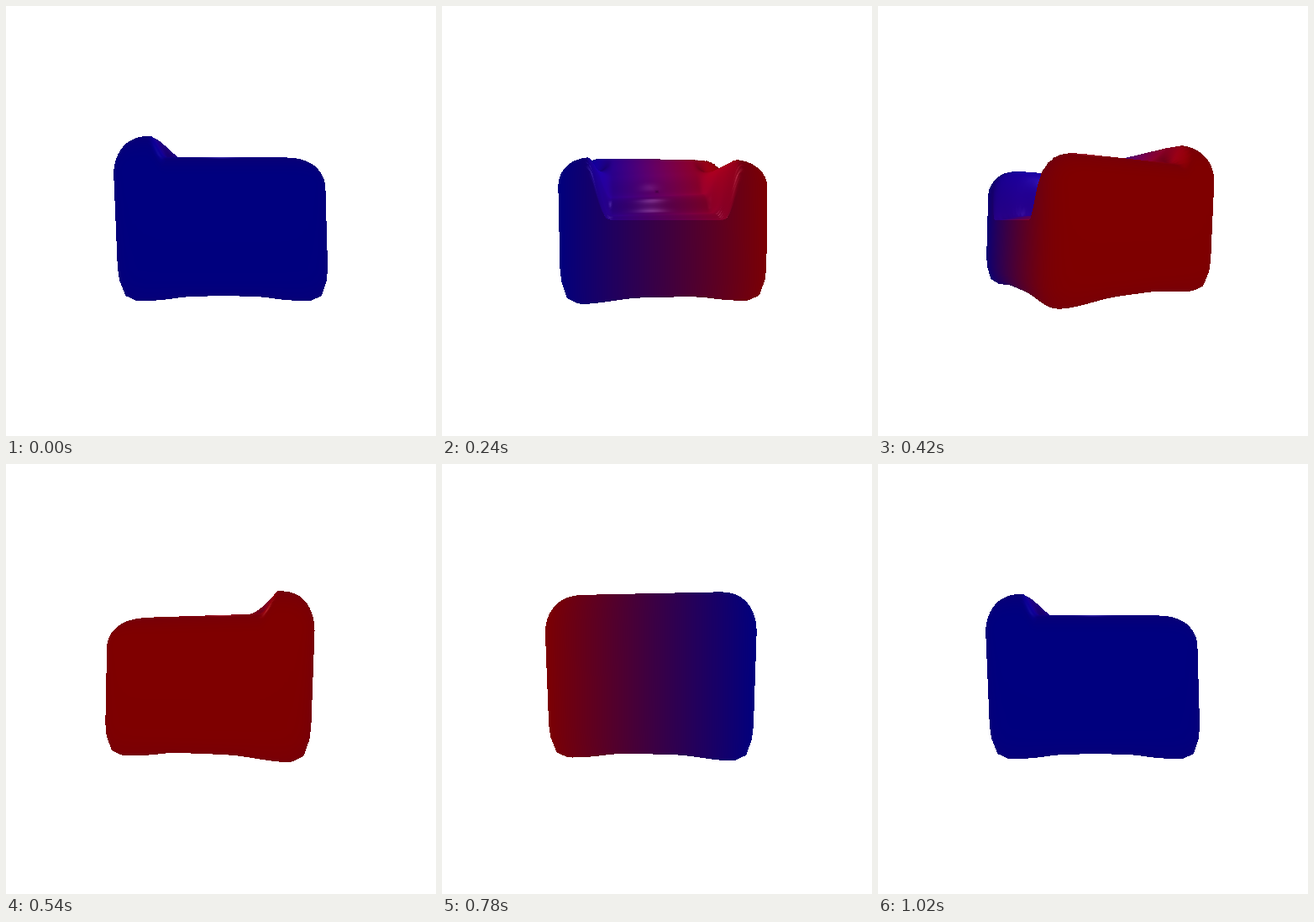
An HTML page with a canvas that plays this animation: 512x512 px, repeating every 1.08 s.

```html
<!DOCTYPE html>
<html>
<head>
<meta charset="utf-8">
<title>Turning armchair</title>
<style>
html, body { margin: 0; width: 100%; height: 100%; overflow: hidden; background: #fff; }
canvas { display: block; }
</style>
</head>
<body>
<canvas id="stage" width="512" height="512"></canvas>
<script>
const SIZE = 512, FOCAL = 443.4, HALF = 0.2285;
const SEGMENTS = 200, TOP_ROWS = 56;
const LIGHT = [0, 0.24, 0];
const STEP = 60, STEPS = 18;

const ctx = document.getElementById('stage').getContext('2d');
const image = ctx.createImageData(SIZE, SIZE);
const pixels = new Uint32Array(image.data.buffer);
const depths = new Float32Array(SIZE * SIZE);

const clamp = v => Math.min(1, Math.max(0, v));
const smooth = (a, b, v) => { const t = clamp((v - a) / (b - a)); return t * t * (3 - 2 * t); };
const mix = (a, b, t) => a + (b - a) * t;
const sub = (a, b) => a.map((v, i) => v - b[i]);
const dot = (a, b) => a[0] * b[0] + a[1] * b[1] + a[2] * b[2];
const cross = (a, b) => [a[1] * b[2] - a[2] * b[1], a[2] * b[0] - a[0] * b[2], a[0] * b[1] - a[1] * b[0]];
const unit = a => { const n = Math.hypot(...a) || 1; return a.map(v => v / n); };

// Upper surface: sloping, rippled seat between arms, rising to the back
function topHeight(x, z) {
  const s = clamp((0.21 - x) / 0.35);
  const ripple = 0.036 * s * (1 - s) * Math.sin(19 * s + 5 * z);
  const seat = 0.004 + 0.187 * s ** 1.6 + ripple;
  const arm = 0.143 + 0.049 * smooth(-0.115, -0.15, x);
  return mix(seat, arm, smooth(0.12, 0.165, Math.abs(z)));
}

// [outline scale, height] from the wall foot to the middle of the underside
const FOOT = [[1, -0.1], [0.99, -0.128], [0.95, -0.15], [0.88, -0.162], [0.78, -0.165], [0, -0.15]];
const ROWS = TOP_ROWS + 2 + FOOT.length;

function point(row, seg) {
  const a = seg / SEGMENTS * 2 * Math.PI, c = Math.cos(a), s = Math.sin(a);
  const r = HALF * (Math.abs(c) ** 12 + Math.abs(s) ** 12) ** (-1 / 12);
  let k = 1, y;
  if (row <= TOP_ROWS + 1) {
    k = Math.sin(Math.min(1, row / TOP_ROWS) * Math.PI / 2);
    const e = clamp((k - 0.65) / 0.35);
    y = topHeight(k * r * c, k * r * s) * (0.5 + 0.5 * Math.sqrt(1 - e ** 2.4));
    if (row > TOP_ROWS) y -= 0.008;
  } else {
    [k, y] = FOOT[row - TOP_ROWS - 2];
    if (y < -0.14) y -= 0.012 * Math.abs(Math.sin(2 * a)) ** 5;
  }
  // The back leans and the sides flare towards the top
  return [1.01 * k * r * c - 0.035 * y, y, k * r * s * (1 + 0.12 * y)];
}

const grid = [];
for (let i = 0; i < ROWS; i++)
  grid.push(Array.from({ length: SEGMENTS }, (_, j) => ({ p: point(i, j) })));

grid.forEach((line, i) => line.forEach((v, j) => {
  const along = sub(line[(j + 1) % SEGMENTS].p, line[(j + SEGMENTS - 1) % SEGMENTS].p);
  const down = sub(grid[Math.min(ROWS - 1, i + 1)][j].p, grid[Math.max(0, i - 1)][j].p);
  v.n = unit(cross(along, down));
  v.toLight = unit(sub(LIGHT, v.p));
  v.diffuse = Math.max(0, dot(v.n, v.toLight));
  v.blue = clamp(v.p[2] / HALF / 2 + 0.5);
}));

function project(v, sin, cos) {
  const [x, y, z] = v.p;
  v.d = 1 - x * sin - z * cos;
  v.x = 256 + FOCAL * (x * cos - z * sin) / v.d;
  v.y = 256 - FOCAL * y / v.d;
  let shine = 0;
  if (v.diffuse > 0) {
    const view = unit(sub([sin, 0, cos], v.p));
    const bounce = v.n.map((n, i) => 2 * v.diffuse * n - v.toLight[i]);
    shine = 51 * Math.max(0, dot(view, bounce)) ** 64;
  }
  const lit = 255 * (0.5 + 0.3 * v.diffuse);
  v.rgb = [lit * (1 - v.blue) + shine, shine, lit * v.blue + shine];
}

function triangle(a, b, c) {
  const area = (b.x - a.x) * (c.y - a.y) - (b.y - a.y) * (c.x - a.x);
  if (Math.abs(area) < 1e-6) return;
  const x0 = Math.ceil(Math.min(a.x, b.x, c.x) - 0.5), x1 = Math.max(a.x, b.x, c.x) - 0.5;
  const y0 = Math.ceil(Math.min(a.y, b.y, c.y) - 0.5), y1 = Math.max(a.y, b.y, c.y) - 0.5;
  for (let y = y0; y <= y1; y++) {
    for (let x = x0; x <= x1; x++) {
      const px = x + 0.5 - a.x, py = y + 0.5 - a.y;
      const v = (px * (c.y - a.y) - py * (c.x - a.x)) / area;
      const w = (py * (b.x - a.x) - px * (b.y - a.y)) / area;
      const u = 1 - v - w;
      if (u < -1e-6 || v < -1e-6 || w < -1e-6) continue;
      const d = u / a.d + v / b.d + w / c.d, at = y * SIZE + x;
      if (d <= depths[at]) continue;
      depths[at] = d;
      const tone = i => u * a.rgb[i] + v * b.rgb[i] + w * c.rgb[i] & 255;
      pixels[at] = (255 << 24 | tone(2) << 16 | tone(1) << 8 | tone(0)) >>> 0;
    }
  }
}

function draw(angle) {
  const sin = Math.sin(angle), cos = Math.cos(angle);
  pixels.fill(0xffffffff);
  depths.fill(0);
  for (const line of grid) for (const v of line) project(v, sin, cos);
  for (let i = 1; i < ROWS; i++) {
    for (let j = 0; j < SEGMENTS; j++) {
      const k = (j + 1) % SEGMENTS, up = grid[i - 1], low = grid[i];
      triangle(up[j], up[k], low[j]);
      triangle(up[k], low[k], low[j]);
    }
  }
  ctx.putImageData(image, 0, 0);
}

let shown = -1;
function tick() {
  const step = Math.floor(performance.now() / STEP) % STEPS;
  if (step !== shown) draw(step / (STEPS - 1) * 2 * Math.PI);
  shown = step;
  requestAnimationFrame(tick);
}
tick();
</script>
</body>
</html>
```
